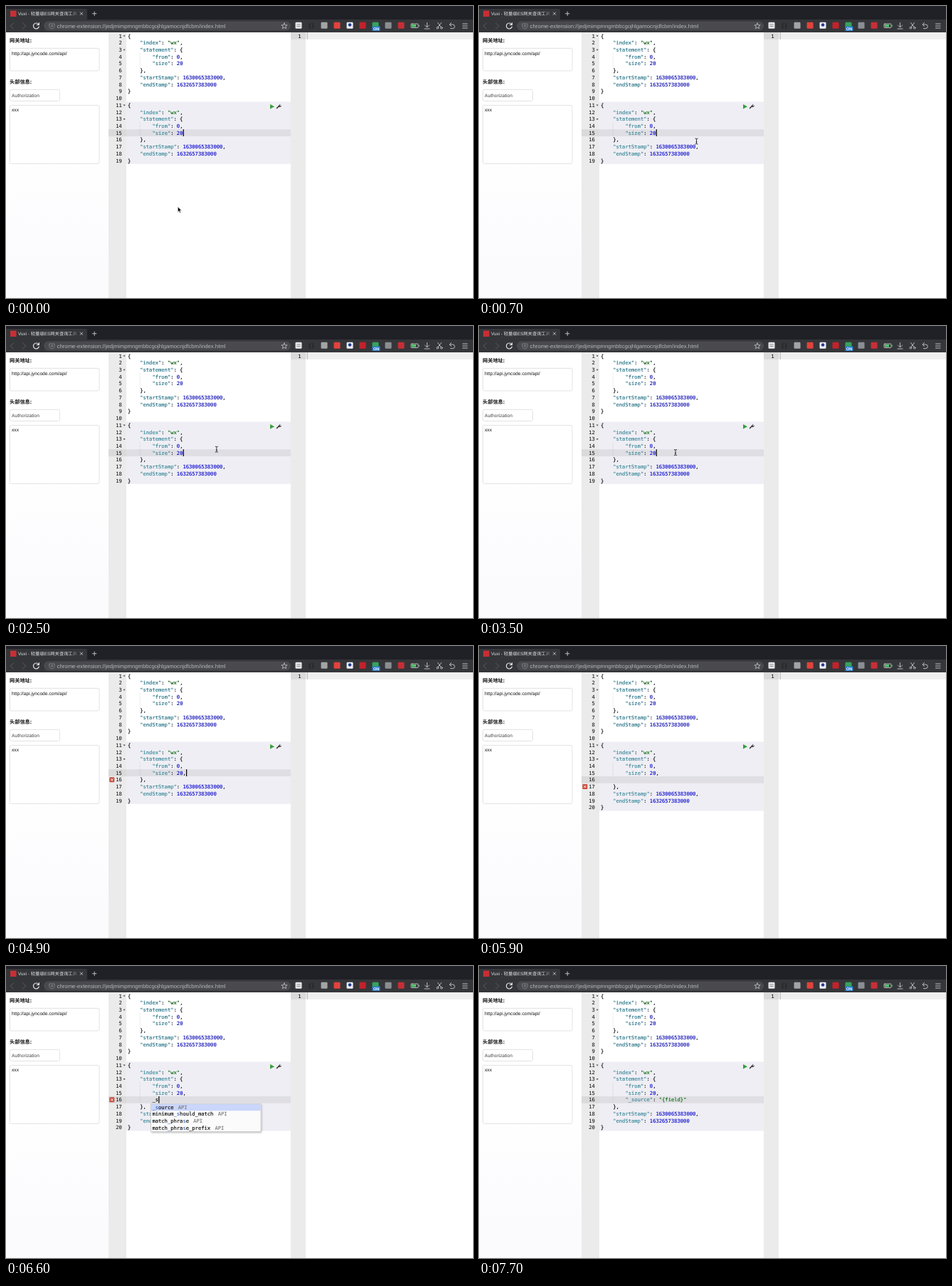
Recreate the animation shown at these times as an HTML page. Size 656 px wide and 410 px high, loop 8000 ms.

```html
<!DOCTYPE html>
<html lang="zh">
<head>
<meta charset="utf-8">
<title>Gateway query tool</title>
<style>
  html, body { margin: 0; width: 100%; height: 100%; overflow: hidden; background: #fff; }
  svg { display: block; width: 656px; height: 410px; }
  text { white-space: pre; text-rendering: geometricPrecision; }
  .ui { font-family: "Liberation Sans", "Noto Sans CJK SC", sans-serif; }
  .cjk { font-family: "Noto Sans CJK SC", "Noto Sans CJK", sans-serif; }
  .code { font: 7.15px "DejaVu Sans Mono", monospace; stroke: currentColor; stroke-width: .12; }
  .key { fill: #318495; stroke: #318495; }
  .str { fill: #036a07; stroke: #036a07; }
  .num { fill: #0000cd; stroke: #0000cd; }
  .first .key { fill: #1c6c80; stroke: #1c6c80; }
  .first .str { fill: #024f05; stroke: #024f05; }
  .first .num { fill: #0000b0; stroke: #0000b0; }
  .hit { fill: #2d69c7; stroke: #2d69c7; }
  .line { fill: none; stroke: #c9cacc; stroke-width: .9; stroke-linecap: round; stroke-linejoin: round; }
  .field { fill: #fff; stroke: #dfdfe3; stroke-width: .9; }
</style>
</head>
<body>
<svg viewBox="0 0 656 410">
  <defs>
    <linearGradient id="side" x2="0" y2="1">
      <stop offset=".45" stop-color="#fff"/><stop offset=".9" stop-color="#fbfafd"/>
    </linearGradient>
    <linearGradient id="fade">
      <stop offset="0" stop-color="#35363a" stop-opacity="0"/><stop offset="1" stop-color="#35363a"/>
    </linearGradient>
    <filter id="shadow" x="-5%" y="-10%" width="112%" height="130%">
      <feDropShadow dx="1" dy="1.4" stdDeviation="1.2" flood-opacity=".25"/>
    </filter>
  </defs>

  <rect width="656" height="410" fill="#fff"/>

  <g id="browser">
    <rect width="656" height="21" fill="#202126"/>
    <path d="M0 4H111Q114 4 114 7V21H0Z" fill="#35363a"/>
    <rect y="19" width="656" height="18" fill="#35363a"/>
    <rect x="6" y="6.500" width="8.500" height="8.500" fill="#c62f35"/>
    <text class="ui" x="17" y="13" font-size="6.350" fill="#e2e3e5">Vuxi - 轻量级ES网关查询工具</text>
    <rect x="90" y="5" width="11" height="13" fill="url(#fade)"/>
    <rect x="100.500" y="5" width="13" height="13" fill="#35363a"/>
    <path class="line" d="M104.300 9l3.400 3.400m0-3.400l-3.400 3.400M121.500 10.700h5.400m-2.700-2.700v5.400"/>
    <path class="line" style="stroke:#5d5f63" d="M10.500 24L6 28l4.500 4M23.500 24L28 28l-4.500 4"/>
    <path class="line" style="stroke:#e2e3e5;stroke-width:1.200" d="M45.700 25.700A4 4 0 1 0 46.300 29M46.400 23.500V26.500H43.400"/>
    <rect x="53" y="21.500" width="347" height="13" rx="6.500" fill="#4a4a4e"/>
    <path class="line" style="stroke:#85888d;stroke-width:.8" d="M61 25h7v4.500q-1 2-3.500 2.500q-2.500-.5-3.500-2.500zM63 28h3m-1.500-1.500v3"/>
    <text class="ui" x="71.600" y="30.500" font-size="7.740" fill="#b4b6b9">chrome-extension://jedjmimpmngmbbcgojhlgamocnjdfcbm/index.html</text>
    <path class="line" style="stroke-width:.8" d="M391 24l1.200 2.700 2.900.2-2.300 1.900.8 2.900-2.600-1.600-2.600 1.600.8-2.900-2.300-1.900 2.900-.2z"/>
    <g id="extensions"></g>
    <rect x="569" y="25" width="10" height="5.500" rx="1" class="line"/>
    <path d="M570 26h6v3.500h-6zM580 26.700h1v2h-1z" fill="#4fc26b"/>
    <path class="line" d="M591.500 23.500v6m-3-2.500l3 3 3-3M588 32h7"/>
    <path class="line" d="M606.500 23.500l4.700 6.200M611.500 23.500l-4.700 6.200"/>
    <circle class="line" cx="606.300" cy="30.700" r="1.300"/><circle class="line" cx="611.700" cy="30.700" r="1.300"/>
    <path class="line" d="M625.500 23.500l-2.500 2.500 2.500 2.500M623.300 26h4.200a2.800 2.800 0 0 1 0 5.600h-3"/>
    <path class="line" d="M641.500 25h6.500m-6.500 3h6.500m-6.500 3h6.500"/>
  </g>

  <g id="sidebar">
    <rect y="37" width="144" height="373" fill="url(#side)"/>
    <g class="cjk" font-size="7.200" font-weight="700" fill="#111">
      <text x="5" y="50.800">网关地址:</text>
      <text x="5" y="108.800">头部信息:</text>
    </g>
    <rect class="field" x="5.400" y="59.400" width="125.600" height="31.600" rx="2"/>
    <rect class="field" x="5.400" y="117.400" width="70" height="16" rx="2"/>
    <rect class="field" x="5.400" y="139.400" width="125.600" height="82" rx="2"/>
    <g class="ui" font-size="6.700" fill="#111">
      <text x="8" y="69">http://api.jyncode.com/api/</text>
      <text x="8" y="128.300" fill="#444">Authorization</text>
      <text x="8" y="148.300">xxx</text>
    </g>
  </g>

  <g id="result">
    <rect x="400" y="37" width="21" height="373" fill="#ebebeb"/>
    <rect x="400" y="37" width="21" height="9.800" fill="#dadada"/>
    <rect x="421" y="37" width="235" height="9.800" fill="#efefef"/>
    <rect x="422.800" y="37" width=".8" height="9.800" fill="#a5a5a5"/>
    <text class="code" x="414.500" y="44.600" text-anchor="end" fill="#222">1</text>
  </g>

  <rect x="144" y="37" width="25" height="373" fill="#ebebeb"/>
  <g id="editor"></g>
  <g id="mouse"></g>
</svg>

<script>
const LOOP = 8000, ROW = 9.72, CHAR = 4.305, LEFT = 171;
const $ = id => document.getElementById(id);
const rowTop = n => 37.1 + (n - 1) * ROW;
const rect = (x, y, w, h, fill, more = '') =>
  `<rect x="${x}" y="${y}" width="${w}" height="${h}" fill="${fill}" ${more}/>`;
const code = (x, y, body, color = '#000', more = '') =>
  `<text class="code" x="${x}" y="${y}" fill="${color}" color="${color}" ${more}>${body}</text>`;

// Toolbar buttons: centre x, colour
$('extensions').innerHTML = [
  [411, '#e4e6e7'], [447, '#a2a4a6'], [465, '#e2423c'], [483, '#eef0f8'],
  [501, '#c5222b'], [519, '#35a35a'], [537, '#8b8f93'], [555, '#c62f35'],
].map(([x, fill]) => rect(x - 4.5, 22.7, 9, 9, fill, 'rx="1.2"')).join('') +
  '<path d="M408.500 26h5m-5 2.500h5" stroke="#777" stroke-width=".8"/>' +
  code(424.6, 30, '{}', '#1d1e20', 'font-weight="700"') +
  '<circle cx="483" cy="26.500" r="2.300" fill="#263c8f"/>' +
  rect(514.5, 28.5, 11, 6.5, '#2d7dd2', 'rx="1"') +
  '<text class="ui" x="520" y="33.900" font-size="5.500" font-weight="700" fill="#fff" text-anchor="middle">ON</text>';

const block = (size, extra = []) => [
  '{', '    "index": "wx",', '    "statement": {', '        "from": 0,',
  '        "size": ' + size, ...extra, '    },',
  '    "startStamp": 1630065383000,', '    "endStamp": 1632657383000', '}',
];
const PAD = ' '.repeat(8);

// Edits: start time, second block, caret row, caret column
const EDITS = [
  [0, block('20'), 15, 18],
  [4600, block('20,'), 15, 19],
  [5300, block('20,', [PAD]), 16, 8],
  [6300, block('20,', [PAD + '_']), 16, 9],
  [6500, block('20,', [PAD + '_s']), 16, 10],
  [7100, block('20,', [PAD + '"_source": "{field}"']), 16, 28],
];
const CARET = [[0, 1], [100, 0], [600, 1], [1100, 0], [1500, 1], [2100, 0], [2500, 1],
  [3100, 0], [3500, 1], [4100, 0], [4500, 1], [5900, 0], [6300, 1], [7700, 0]];
const ERROR_ROW = [[0, 0], [4900, 16], [5300, 17], [6600, 16], [7300, 0]];
const SHORT = ['_source', 'minimum_should_match', 'match_phrase', 'match_phrase_prefix'];
const POPUP = [[0, null], [6300, [...SHORT, 'multi_match', 'match_all', 'has_child']],
  [6500, SHORT], [7100, null]];
const PATH = [[100, 246.5, 243], [200, 246.5, 243], [400, 274, 216], [700, 305.5, 190],
  [900, 305.5, 190], [1500, 311, 174], [1600, 311, 174], [1700, 313.5, 173],
  [1900, 335.5, 164.5], [2300, 335.5, 164.5], [2600, 276, 177.5], [4500, 276, 177.5]];

const at = (table, t) => table.findLast(step => step[0] <= t);

const paint = line => line.replace(/("\w+")(?=:)|("[^"]*")|(\d+)/g, (m, key, str) =>
  `<tspan class="${key ? 'key' : str ? 'str' : 'num'}">${m}</tspan>`);

function drawLine(line, i) {
  const n = i + 1, y = rowTop(n), indent = line.search(/\S|$/), text = line.trim();
  let out = code(162.8, y + 7.5, n, '#222', 'text-anchor="end"');
  if (line.endsWith('{')) out += `<path d="M164.600 ${y + 4.2}h3l-1.500 2z" fill="#444"/>`;
  if (indent === 8 && text) {
    const x = LEFT + 4 * CHAR;
    out += `<path d="M${x} ${y}v${ROW}" stroke="#bbb" stroke-width=".5" stroke-dasharray=".6 .6"/>`;
  }
  out += code(LEFT + indent * CHAR, y + 7.5, paint(text));
  return n < 11 ? `<g class="first">${out}</g>` : out;
}

function drawPopup(items, typed) {
  const x = 203.5, top = rowTop(17) + .9;
  const pattern = typed === '_s' ? /(_)([^s]*)(s)/ : /(_)()()/;
  const mark = s => s && `<tspan class="hit">${s}</tspan>`;
  return rect(x, top, 154.5, items.length * ROW, '#fbfbfb', 'stroke="#c4c4c4" stroke-width=".7" filter="url(#shadow)"') +
    rect(x + .4, top + .3, 153.7, ROW - .3, '#cad6fa') +
    items.map((name, i) => {
      const y = top + i * ROW + 7.2;
      return code(205.4, y, name.replace(pattern, (m, a, b, c) => mark(a) + b + mark(c))) +
        code(205.4 + name.length * CHAR + 6.2, y, 'API', '#777');
    }).join('');
}

function drawEditor(t) {
  const [, second, row, col] = at(EDITS, t);
  const lines = [...block('20'), '', ...second];
  const errorRow = at(ERROR_ROW, t)[1], items = at(POPUP, t)[1], y = rowTop(row);
  let out = rect(169, rowTop(11), 231, second.length * ROW, '#efeef4') +
    rect(144, y, 25, ROW, '#dadada') + rect(169, y, 231, ROW, '#dfdee3') +
    lines.map(drawLine).join('') +
    '<path d="M371 138l6 3.200-6 3.200z" fill="#35a03a"/>' +
    '<path d="M380.500 143.500l3.200-3.200" stroke="#333" stroke-width="1.500" stroke-linecap="round"/>' +
    '<path d="M385.200 138.500l-1 1 .4.900.9.300 1-1a2 2 0 0 1-3 1.800a2 2 0 0 1 1.700-3z" fill="#333" stroke="#333" stroke-width=".5"/>';
  if (errorRow) {
    const c = rowTop(errorRow) + 4.9;
    out += rect(145.3, c - 3.5, 7, 7, '#cb4a3c', 'rx="1"') +
      `<path d="M147.200 ${c - 1.6}l3.200 3.200m0-3.200l-3.200 3.200" stroke="#fff" stroke-width="1"/>`;
  }
  if (at(CARET, t)[1]) out += rect(LEFT + col * CHAR + .2, y, 1.2, ROW, '#000');
  if (items) out += drawPopup(items, lines[15].trim());
  return out;
}

function drawMouse(t) {
  if (t < 100) {
    return '<path d="M241.300 281.800v7.600l1.700-1.600 1.200 2.800 1.300-.6-1.200-2.700h2.300z" fill="#000" stroke="#fff" stroke-width=".6"/>';
  }
  const i = PATH.findIndex(p => p[0] > t);
  if (i < 1) return '';
  const [t0, x0, y0] = PATH[i - 1], [t1, x1, y1] = PATH[i], k = (t - t0) / (t1 - t0);
  const x = x0 + (x1 - x0) * k, y = y0 + (y1 - y0) * k;
  return `<path transform="translate(${x} ${y})" fill="none" stroke="#222" stroke-width=".9"
    d="M-2-4Q0-4 0-3Q0-4 2-4M0-3V3M-2 4Q0 4 0 3Q0 4 2 4M-1 1H1"/>`;
}

let shown = -1;
function frame(now) {
  const t = Math.floor((now % LOOP) / 100) * 100;
  if (t !== shown) {
    shown = t;
    $('editor').innerHTML = drawEditor(t);
    $('mouse').innerHTML = drawMouse(t);
  }
  requestAnimationFrame(() => frame(performance.now() - start));
}
const start = performance.now();
frame(0);
</script>
</body>
</html>
```
